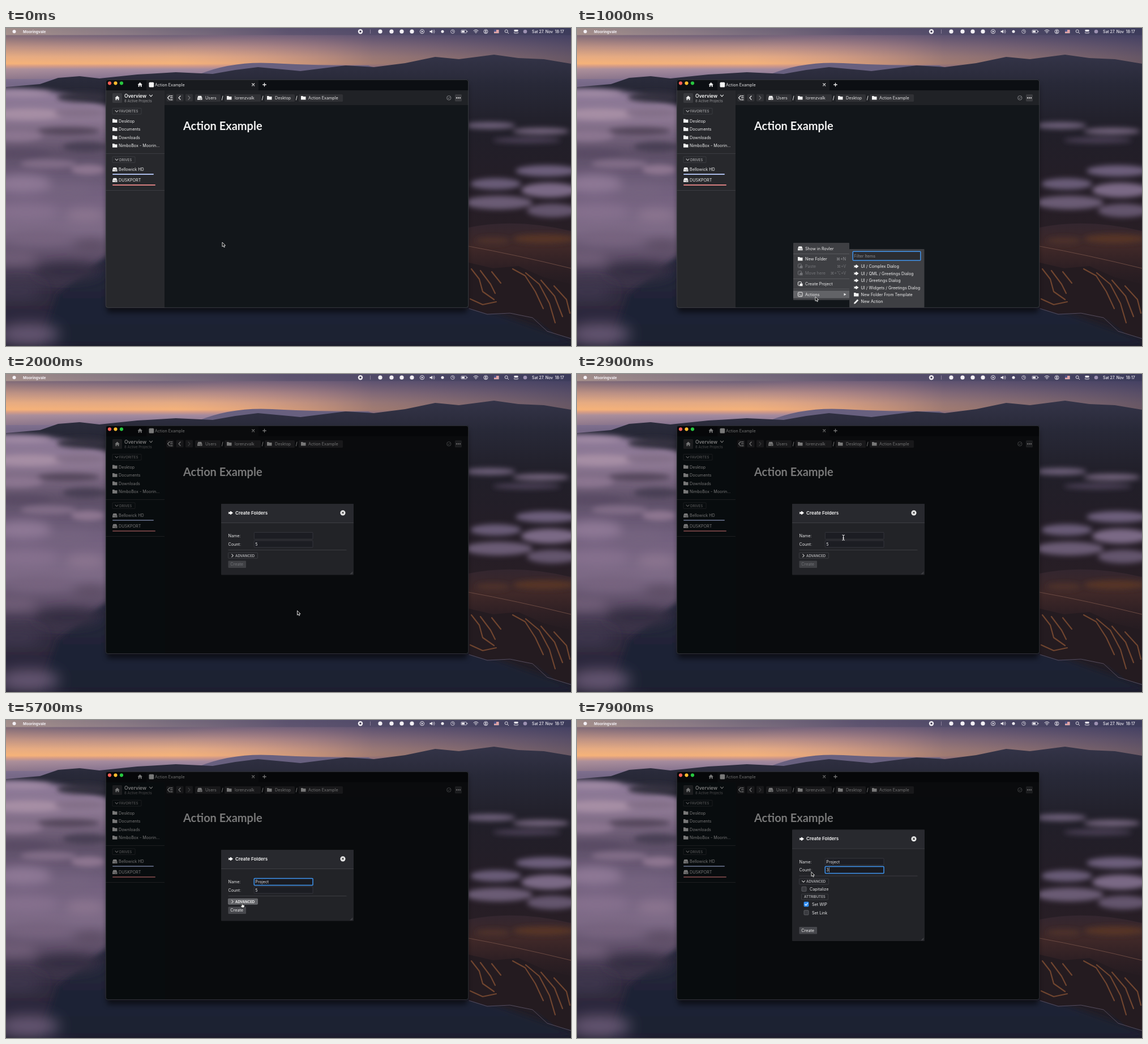
Recreate the animation shown at these times as an HTML page. Size 998 by 561 pixels, loop 8 s.

```html
<!DOCTYPE html>
<html lang="en">
<head>
<meta charset="utf-8">
<title>Create folders action</title>
<style>
html, body { margin: 0; width: 100%; height: 100%; overflow: hidden; background: #1d2133; }
svg { position: absolute; left: 0; top: 0; width: 998px; height: 561px; font-family: Inter, "Open Sans", sans-serif; }
text { white-space: pre; }
#bg { will-change: transform; }
.dim .side { fill: #11181c; }
.dim .bar { fill: #14171a; }
</style>
</head>
<body>
<svg id="bg" viewBox="0 0 998 561"></svg>
<svg id="ui" viewBox="0 0 998 561"><g id="app"></g><g id="live"></g></svg>
<script>
const $ = id => document.getElementById(id);
const R = (x, y, w, h, fill, r = 0, more = '') =>
  `<rect x="${x}" y="${y}" width="${w}" height="${h}" rx="${r}" fill="${fill}" ${more}/>`;
const T = (x, y, s, size = 7.2, fill = '#e4e4e5', more = '') =>
  `<text x="${x}" y="${y}" font-size="${size}" fill="${fill}" ${more}>${s}</text>`;
const P = (d, fill, more = '') => `<path d="${d}" fill="${fill}" ${more}/>`;
const L = (d, stroke = '#e4e4e5', w = 1) =>
  P(d, 'none', `stroke="${stroke}" stroke-width="${w}" stroke-linecap="round" stroke-linejoin="round"`);
const C = (x, y, r, fill, more = '') => `<circle cx="${x}" cy="${y}" r="${r}" fill="${fill}" ${more}/>`;
const ring = (x, y, r, stroke = '#eee', w = .9) => C(x, y, r, 'none', `stroke="${stroke}" stroke-width="${w}"`);
const box = (x, y, w, h, stroke = '#414247', fill = 'none', sw = .8) =>
  R(x, y, w, h, fill, 1, `stroke="${stroke}" stroke-width="${sw}"`);
const bold = 'font-weight="600"';

// Icons, placed by their left edge and vertical centre
const folder = (x, y, c = '#f2f2f2') => P(`M${x} ${y - 3.3}h3.2l1 1.1h4.3v5.5h-8.5z`, c);
const drive = (x, y, c = '#f2f2f2') =>
  P(`M${x + 1.5} ${y - 3.5}h5.5l1.5 3.7v3.3h-8.5v-3.3z`, c) + L(`M${x + .6} ${y + .6}h7.3M${x + 5} ${y + 2.2}h1.6`, '#55565a', .6);
const home = (x, y) => P(`M${x} ${y}l4.2-4 4.2 4h-1.2v3.7h-2v-2.4h-2v2.4h-2v-3.7z`, '#ececec');
const fish = (x, y, c = '#f2f2f2') => P(`M${x} ${y - 2}l2 1 2.4-2.2 4.2 3.2-4.2 3.2-2.4-2-2 1 .8-2z`, c);
const chevron = (x, y, c) => L(`M${x - 2.5} ${y - 1.3}l2.5 2.6 2.5-2.6`, c, 1.1);
const cross = (x, y, r, c, w) => L(`M${x - r} ${y - r}l${2 * r} ${2 * r}m0 ${-2 * r}l${-2 * r} ${2 * r}`, c, w);

function scenery() {
  const down = 'x2="0" y2="1"';
  const grad = (id, stops, dir = down) => `<linearGradient id="${id}" ${dir}>` +
    stops.map(([o, c, a = 1]) => `<stop offset="${o}" stop-color="${c}" stop-opacity="${a}"/>`).join('') + '</linearGradient>';
  const blur = (id, n) => `<filter id="${id}" x="-30%" y="-60%" width="160%" height="220%"><feGaussianBlur stdDeviation="${n}"/></filter>`;
  const soft = (id, list) => `<g filter="url(#${id})">` + list.map(([x, y, rx, ry, c]) =>
    `<ellipse cx="${x}" cy="${y}" rx="${rx}" ry="${ry}" fill="${c}"/>`).join('') + '</g>';
  return '<defs>' +
    grad('sky', [[0, '#55506f'], [.13, '#75647a'], [.3, '#b58d86'], [.45, '#e3aa84'], [.56, '#f5b27a'], [.6, '#d29a88'], [.65, '#a28a9f'], [.8, '#80708f'], [1, '#665c7b']]) +
    grad('dusk', [[0, '#ffb870', .12], [.3, '#b98090', 0], [.65, '#4c4468', .5], [1, '#34355a', .72]], '') +
    grad('bar', [[0, '#b7a296', .7], [.2, '#9c8b8d', .65], [.5, '#57506c', .65], [1, '#3a3a58', .7]], '') +
    grad('land', [[0, '#343448'], [.1, '#282938'], [.25, '#211f29'], [.5, '#251d26'], [.75, '#2c2024'], [1, '#1d1c26']]) +
    grad('mass', [[0, '#8b7897'], [.12, '#8d7893'], [.25, '#5d4f67'], [.4, '#72607e'], [.55, '#7d6a86'], [.68, '#54465f'], [.8, '#2e293c'], [1, '#282637']]) +
    grad('sea', [[0, '#282a3d'], [.5, '#1f2336'], [1, '#1a1f31']]) +
    grad('hill', [[0, '#33262f'], [.35, '#3f2828'], [.6, '#2f2024'], [1, '#1f191f']]) +
    blur('b1', .7) + blur('b2', 5) + blur('b3', 9) + blur('b4', 13) + '</defs>' +
    R(0, 0, 998, 112, 'url(#sky)') + R(0, 0, 998, 90, 'url(#dusk)') +
    P('M340 82Q400 58 470 62T640 66L700 90H340z', '#68607f', 'filter="url(#b1)"') +
    P('M0 104L60 99 92 88 130 85 165 89 232 82 300 78 365 81 405 74 445 69 520 76 600 66 650 69 705 62 758 51 800 55 862 47 905 53 950 55 998 63V561H0z', 'url(#land)', 'filter="url(#b1)"') +
    P('M-20 106Q60 104 120 120L190 140V470L120 561H-20z', 'url(#mass)', 'filter="url(#b2)"') +
    P('M90 470L180 400V490H820L870 505 998 550V561H60z', 'url(#sea)', 'filter="url(#b2)"') +
    soft('b2', [[30, 116, 50, 5, '#a18ba4'], [135, 122, 45, 9, '#35303f'], [40, 152, 65, 10, '#a68ea4'], [130, 150, 45, 7, '#836f88'],
      [110, 182, 55, 7, '#54475c'], [20, 190, 45, 10, '#8a748f'], [140, 210, 40, 9, '#4a3f54'], [30, 222, 50, 8, '#5a4c65'],
      [75, 240, 50, 8, '#806c86'], [145, 250, 30, 9, '#8d7690']]) +
    soft('b3', [[30, 275, 50, 16, '#8e7895'], [110, 290, 45, 14, '#75637f'], [35, 325, 60, 15, '#85708d'], [140, 330, 35, 12, '#8b758f'],
      [60, 370, 55, 12, '#77647f'], [150, 385, 30, 10, '#5d4d65'], [15, 405, 40, 12, '#6f5d77'], [110, 430, 60, 16, '#352e42']]) +
    soft('b4', [[20, 465, 45, 14, '#40374f'], [40, 540, 55, 18, '#685874']]) +
    soft('b2', [[855, 172, 45, 6, '#6e607a'], [945, 182, 50, 6, '#71627a'], [920, 198, 60, 5, '#4b4056'],
      [955, 252, 55, 10, '#6d5f7b'], [865, 275, 45, 10, '#695b77'], [960, 286, 50, 13, '#7a6985'], [870, 308, 60, 12, '#6a5b75'], [965, 322, 45, 12, '#63546d']]) +
    P('M817 352Q900 335 998 358V470Q900 430 817 414z', 'url(#hill)', 'filter="url(#b1)"') +
    soft('b2', [[950, 372, 55, 8, '#573528'], [860, 375, 30, 6, '#4d302b']]) +
    L('M817 385Q900 400 998 424', '#6b4a42', 1) +
    P('M817 414L860 424 905 420 950 440 998 452V546L970 540 940 514 895 502 850 504 817 494z', '#241b20', 'filter="url(#b1)"') +
    L('M822 425l14 18 6 22 20 14M838 428l18 24 8 16M858 430l16 20M895 425l22 12 18 28 14 30M918 432l24 20 18 34 10 34M945 445l24 28 14 36M968 455l22 24 6 24M820 478l22 10 24-5', '#70452f', 2.2) +
    L('M818 495L850 505 890 503 930 511 956 535 998 548', '#62576a', .8) +
    R(178, 98, 637, 404, '#000', 5, 'opacity=".55" filter="url(#b2)"');
}

function menuBar() {
  const w = '#f3f0f5';
  return R(0, 0, 998, 12.5, 'url(#bar)') + C(14.5, 6.2, 3, w) +
    T(30, 8.7, 'Mooringvale', 6.6, w, 'font-weight="700"') + T(929, 8.7, 'Sat 27. Nov  18:17', 6.9, w, 'font-weight="500"') +
    C(626, 6.2, 4.2, w) + R(624.5, 4.7, 3, 3, '#39344d') + L('M643.5 3v6.5', '#8b8099', 1) +
    [661, 681, 699, 717, 771].map(x => C(x, 6.2, x == 771 ? 2.5 : 3.6, w)).join('') +
    ring(735, 6.2, 3.6, w) + P('M734 4.4l3 1.8-3 1.8z', w) +
    P('M748.5 5h2l2.5-2v6.5l-2.5-2h-2z', w) + L('M754.5 4.5q1.5 1.7 0 3.4M756 3q2.6 3.2 0 6.4', w, .7) +
    ring(789, 6.2, 3.3, w, .7) + L('M789 4v2.4h1.7', w, .7) +
    box(804, 3.7, 9.5, 5, w, 'none', .7) + R(805, 4.7, 5, 3, w) + R(814.3, 5.2, 1, 2, w) +
    L('M826 4.8q4-3.4 8 0M827.6 6.6q2.4-2 4.8 0M829.4 8.3h1.2', w, 1) +
    ring(847.5, 6.2, 3.5, w) + C(847.5, 5.2, 1.2, w) + P('M845.2 8.6q2.3-3 4.6 0z', w) +
    R(862, 3.2, 8.5, 6, '#eee') + L('M862.5 4h7.5m-7.5 2h7.5m-7.5 2h7.5', '#d34b52', .9) + R(862, 3.2, 4, 3.2, '#46528c') +
    ring(883.7, 5.6, 2.5, w) + L('M885.7 7.6l2 2', w, 1) +
    R(897.3, 3, 7.5, 2.8, w, 1.4) + box(897.5, 7, 7, 2.4, w, 'none', .7) + C(917, 6.2, 3.3, '#9d91b2');
}

function windowBody() {
  const pill = (x, w, tx, s, icon) => R(x, 117, w, 13, '#303135', 1.5) + icon(x + 4, 123.3) + T(tx, 126, s);
  const row = (y, s, icon = folder) => icon(188, y - 2.8) + T(199, y, s, 7.2, '#ededed');
  const label = (y, w, s) => box(188, y, w, 10.5) + chevron(195.5, y + 5.3, '#a9a9ab') +
    T(200, y + 7.6, s, 6.2, '#a5a5a8', 'font-weight="500"');
  return R(176, 91, 641, 402.5, '#12161a', 4) + P('M176 110V95q0-4 4-4H813q4 0 4 4V110z', '#0c0f13') +
    R(176, 110, 641, 26, '#202226', 0, 'class="bar"') + P('M176 110h104v383.5h-100q-4 0-4-4z', '#27282c', 'class="side"') +
    R(248, 92, 198, 18, '#191b1f', 1, 'class="bar"') + home(232.5, 100) + R(252.5, 95.7, 8.7, 8.7, '#f4f4f4', 1.5) +
    T(263, 102.8, 'Action Example') + cross(436.7, 100, 2, '#eee', 1.1) + L('M453.7 100h5.6m-2.8-2.8v5.6', '#eee', 1.3) +
    R(188, 115, 17, 17, '#393a3e', 1.5) + home(192.3, 123.6) +
    T(209, 123, 'Overview', 8.5, '#f5f5f5', bold) + chevron(256, 119.5, '#eee') + T(209, 131, '8 Active Projects', 6.1, '#98989b') +
    [283.5, 300.5, 317].map(x => R(x, 116.5, 13, 13, '#303135', 1.5)).join('') +
    L('M289 119.5l-3.5 3.7 3.5 3.7M290.5 119.8h3.5m-3.5 3.4h3.5m-3.5 3.4h3.5M308 120l-3 3.2 3 3.2', '#f2f2f2', 1.2) + L('M322 120l3 3.2-3 3.2', '#77787b', 1.2) +
    pill(334, 45, 352, 'Users', drive) + pill(386, 64, 404, 'lorenzvalk', folder) +
    pill(457, 53, 475, 'Desktop', folder) + pill(517, 78, 534, 'Action Example', folder) +
    L('M383 120l-1.6 7M454 120l-1.6 7M514 120l-1.6 7', '#ddd', 1) +
    ring(782.3, 123.3, 3.7, '#9a9b9e', .8) + L('M780.5 123.3l1.3 1.4 2.5-2.6', '#9a9b9e', .8) +
    R(793, 117, 12, 12.5, '#393a3e', 1.5) + [796, 799, 802].map(x => C(x, 123.3, 1.1, '#eee')).join('') +
    label(141.5, 51, 'FAVORITES') + row(166.6, 'Desktop') + row(181.2, 'Documents') + row(195.7, 'Downloads') + row(210.2, 'NimboBox - Moorin...') +
    R(176, 221, 104, 1, '#3b3c41') + label(227, 40, 'DRIVES') + row(252.4, 'Bellowick HD', drive) + R(188, 257, 73, 2, '#abbcea', 1) +
    row(271, 'DUSKPORT', drive) + R(188, 276, 76, 2, '#d77f80', 1) + R(176, 286, 104, 1, '#3b3c41') +
    T(313, 180.3, 'Action Example', 20, '#f2f2f2', 'font-weight="700" style="font-family:Lato,sans-serif"') +
    box(176.3, 91.3, 640.4, 402, '#45474c').replace('rx="1"', 'rx="4"');
}

const path = [[0, 382, 378], [300, 382, 378], [900, 421, 474], [1100, 421, 474], [1400, 490, 470], [1800, 514.5, 417.5],
  [2300, 514.5, 417.5], [3000, 468, 281], [5400, 468, 281], [5700, 417, 323], [5900, 417, 323], [6700, 446, 264], [7000, 414, 268], [8000, 414, 268]];
function pointer(t) {
  const i = path.findIndex(k => k[0] > t), [a, x, y] = path[i - 1], [b, u, v] = path[i];
  const p = (t - a) / (b - a), e = p * p * (3 - 2 * p);
  return [x + (u - x) * e, y + (v - y) * e];
}

function cursor(x, y, kind) {
  const shape = {
    arrow: P('M0 0V7.8L1.8 6.2 3 8.9 4.4 8.3 3.2 5.7H5.6Z', '#111', 'stroke="#fff" stroke-width=".8"'),
    beam: L('M-1.8-4.6Q0-4.6 0-3.4V3.4Q0 4.6-1.8 4.6M1.8-4.6Q0-4.6 0-3.4M0 3.4Q0 4.6 1.8 4.6M-1 .8h2', '#fff', 1),
    hand: P('M-.7 0Q.2-.8.9 0V3L3.8 3.6Q4.5 4 4.3 5L3.6 8H-.5L-2.8 4.8Q-2.4 3.8-.7 5Z', '#fff', 'stroke="#111" stroke-width=".7"')
  }[kind];
  return `<g transform="translate(${x.toFixed(1)} ${y.toFixed(1)})">${shape}</g>`;
}

function menus(t, x, y) {
  const bg = '#3e3f43', hot = '#626367', off = '#737478', sub = t >= 900;
  const near = base => Math.abs(y - base + 2.8) < 6.2;
  const item = (base, s, icon, keys, dull, on) => (on ? R(382, base - 9.3, 99, 13.3, hot) : '') +
    icon(390, base - 2.7, dull ? off : '#f2f2f2') + T(403, base, s, 7.2, dull ? off : '#eee') +
    (keys ? T(475, base, keys, 7, dull ? off : '#97989b', 'text-anchor="end"') : '');
  const page = (a, b, c) => box(a + .5, b - 3.5, 6, 6.5, c, 'none', 1) + R(a + 3.5, b - .5, 5, 4.5, c);
  const term = (a, b, c) => box(a + .5, b - 3.7, 7.5, 7.5, c, 'none', 1) + L(`M${a + 2.5} ${b - 1.5}l1.6 1.5-1.6 1.5m2.3.3h1.4`, c, .8);
  const pencil = (a, b, c) => P(`M${a} ${b + 4}l.7-2.6 5.6-5.6 2 2-5.6 5.6z`, c);
  let s = R(382, 379, 99, 101, bg, 1);
  const rows = [[391.5, 'Show in Rovler', drive], [410, 'New Folder', folder, '⌘+N'], [422.5, 'Paste', page, '⌘+V', 1],
    [435, 'Move here', page, '⌘+⌥+V', 1], [454, 'Create Project', page], [472.6, 'Actions', term]];
  for (const [base, name, icon, keys, dull] of rows)
    s += item(base, name, icon, keys, dull, sub ? name == 'Actions' : !dull && x > 382.5 && near(base));
  s += [398, 442, 460].map(v => R(382, v, 99, 1, '#57585c')).join('') + P('M471.5 467.8l4 2.2-4 2.2z', '#eee');
  if (!sub) return s;
  s += R(481, 390, 132.5, 103, bg, 1) + box(487.3, 394.3, 119.5, 15.6, '#4195ee', '#2b2c30', 1.5) + T(489.5, 404.7, 'Filter Items', 7.2, '#8b8c90');
  if (t >= 1500) s += R(489, 398, .8, 8, '#eee');
  const acts = ['UI / Complex Dialog', 'UI / QML / Greetings Dialog', 'UI / Greetings Dialog', 'UI / Widgets / Greetings Dialog', 'New Folder From Template', 'New Action'];
  acts.forEach((name, i) => {
    const base = 423.2 + i * 12.45, c = t >= 1900 && !i ? off : '#f0f0f0';
    if (t < 1900 && x > 481 && near(base)) s += R(481, base - 8.8, 132.5, 12.4, hot);
    s += (i < 4 ? fish : i < 5 ? folder : pencil)(489, base - 2.7, c) + T(501.5, base, name, 7.2, c);
  });
  return s;
}

function dialog(t) {
  const open = t >= 5900, top = open ? 193.5 : 229, end = open ? 390 : 354.5, dy = open ? -35.3 : 0;
  const typed = [4100, 4300, 4400, 4600, 4700, 4900, 5000].filter(k => t >= k).length;
  const field = (y, s, focus, caret) => box(438.3, y, 103.7, 12, focus ? '#3f95f0' : '#3b3c43', focus ? '#191a20' : '#1c1d23', focus ? 1.5 : .8) +
    T(440.3, y + 8.8, s + (caret ? '<tspan dx="-.5">|</tspan>' : ''), 7.2);
  const tag = (x, y, w, tx, s, hot) => box(x, y, w, 10, hot ? '#737478' : '#414247', hot ? '#626367' : 'none') +
    T(tx, y + 7.3, s, 6.1, hot ? '#fff' : '#b1b1b4', bold);
  const check = (x, y, s, on) => box(x, y, 8, 8, on ? '#2f8df5' : '#66676c', on ? '#2f8df5' : '#3a3b40') +
    (on ? L(`M${x + 1.8} ${y + 4}l1.7 1.8 3-3.8`, '#fff', 1.1) : '') + T(x + 14 - (x > 400 ? 0 : 0), y + 6.8, s);
  const picked = t >= 7000 && t < 7700, ready = typed > 0, by = open ? 365 : 329.6;
  const count = t < 7700 ? '5' : t < 7900 ? '' : '3';
  let s = R(380, top, 234, end - top, '#222327', 1) + R(380, top, 234, 33, '#28292e', 1) + R(380, top + 33, 234, 1, '#3d3e43') +
    `<g transform="translate(0 ${dy})">` + fish(392.5, 245) + T(405, 247.8, 'Create Folders', 8.1, '#f6f6f6', bold) +
    C(595, 245, 4.5, '#f4f4f4') + cross(595, 245, 1.5, '#222', 1.1) + T(392.5, 288, 'Name:') + T(392.5, 302.5, 'Count:') +
    field(279.4, 'Project'.slice(0, typed), t >= 3300 && t < 6700, t >= 3300 && t < 3700 || t >= 4100 && t < 5500) +
    field(293.9, count, t >= 6700, t >= 6700 && !picked) + (picked ? R(440, 296, 5, 8, '#3f78c4', 0, 'opacity=".6"') : '') +
    R(392.5, 310, 209, .8, '#424348') + tag(392.5, 315.2, 52, 405, 'ADVANCED', t >= 5600 && t < 6200) +
    (open ? chevron(400, 320.2, '#ccc') : L('M398.8 317.8l2.5 2.5-2.5 2.5', '#ccc', 1.1)) + '</g>';
  if (open) s += check(397, 294.2, 'Capitalize') + tag(396.5, 307, 47, 401, 'ATTRIBUTES') + check(401, 321, 'Set WIP', true) + check(401, 335.8, 'Set Link');
  return s + R(392.5, by, 31.5, 12.4, ready ? '#47484d' : '#3f4044', 1) + T(396.3, by + 8.8, 'Create', 7.2, ready ? '#eee' : '#727378') +
    L(`M608.5 ${end - 1.5}l3.5-3.5m-1.5 3.5l1.5-1.5`, '#77787c', .6);
}

function draw(t) {
  const [x, y] = pointer(t), dim = t >= 2000;
  const lights = ['#ff5f57', '#febc2e', '#28c840'].map((c, i) => C(183 + i * 10.5, 97.3, 3.1, c)).join('');
  const kind = t >= 2900 && t < 5500 || t >= 6600 && t < 6900 ? 'beam' : t >= 5600 && t < 6200 ? 'hand' : 'arrow';
  $('app').setAttribute('class', dim ? 'dim' : '');
  $('live').innerHTML = (dim ? R(176.5, 91.5, 640, 401.5, '#000', 4, 'opacity=".5"') : '') + lights +
    (dim ? dialog(t) : t >= 200 ? menus(t, x, y) : '') + cursor(x, y, kind);
}

$('bg').innerHTML = scenery();
$('app').innerHTML = menuBar() + windowBody();
let last = -1;
function tick() {
  const t = Math.floor(performance.now() % 8000 / 100) * 100;
  if (t != last) draw(last = t);
  requestAnimationFrame(tick);
}
tick();
</script>
</body>
</html>
```
